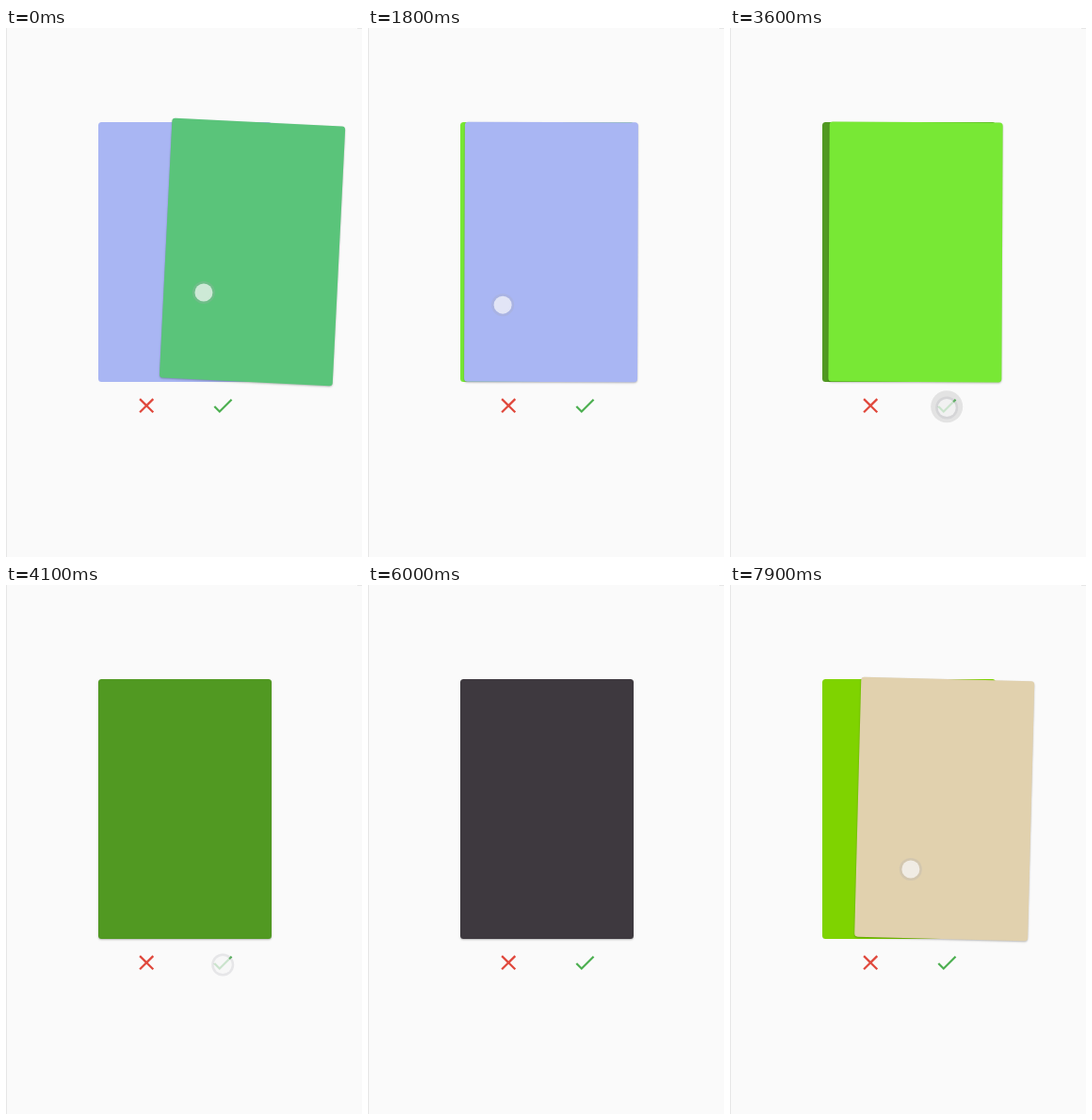
Recreate the animation shown at these times as an HTML page with a canvas. Size 378x562 px, loop 8 s.

```html
<!DOCTYPE html>
<html lang="en">
<head>
<meta charset="utf-8">
<title>Swipe cards</title>
<style>
  html, body { margin: 0; width: 100%; height: 100%; overflow: hidden; background: #fafafa; }
  canvas { display: block; }
</style>
</head>
<body>
<canvas id="stage" width="378" height="562"></canvas>
<script>
const ctx = document.getElementById('stage').getContext('2d');
const LOOP = 8000, STEP = 100;
const CARD = { x: 190, y: 238, w: 184, h: 276 };
const TILT = 15 / 378 * Math.PI / 180;   // rotation per pixel of offset
const GONE = 310;                        // offset at which a card has left the stage
const NO = { x: 149.2, y: 401.2 }, YES = { x: 230.2, y: 401.2 };
const CROSS = new Path2D('M19 6.41L17.59 5 12 10.59 6.41 5 5 6.41 10.59 12 5 17.59 6.41 19 12 13.41 17.59 19 19 17.59 13.41 12z');
const CHECK = new Path2D('M9 16.17L4.83 12l-1.42 1.41L9 19 21 7l-1.41-1.41z');

const clamp = v => Math.min(1, Math.max(0, v));
const smooth = v => v * v * (3 - 2 * v);
const fling = ms => 0.00346 * Math.max(0, ms) ** 2;

// The finger pulls the card smoothly to its reach, then lets it fly off
function drag(color, press, up, reach, x, y) {
  const offset = t => reach * smooth(clamp((t - press) / (up - press))) + fling(t - up);
  return {
    color, offset,
    dot: t => t >= press && t < up && { x: x + 1.05 * offset(t), y: y + 0.034 * offset(t) }
  };
}

// A button is pressed, and the card flies off to its side
function tap(color, button, press, go) {
  const dir = button === YES ? 1 : -1, end = go + 140;
  return {
    color,
    offset: t => dir * fling(t - go),
    dot: t => t >= press && t < go + 100 && { x: button.x, y: button.y + 2.3 },
    splash: t => t > press && t < end && {
      x: button.x, y: button.y + 1,
      r: Math.min(30, (t - press) * 0.085),
      alpha: 0.1 * clamp((end - t) / 100)
    }
  };
}

const cards = [
  drag('#5ac47a', -428, 700, 221.8, 134.8, 278.6),
  drag('#a9b6f3', 1750, 2400, 266, 138.4, 294),
  tap('#78e835', YES, 3400, 3555),
  tap('#519922', YES, 4100, 4434),
  tap('#d61b76', NO, 5400, 5455),
  tap('#3e393f', NO, 6400, 6431),
  drag('#e1d1ae', 7600, 8860, 263.5, 152.3, 300.7),
  { color: '#7fd300' }
];

function drawCard(color, dx, lifted) {
  ctx.save();
  ctx.translate(CARD.x + dx, CARD.y);
  ctx.rotate(dx * TILT);
  if (lifted) {
    ctx.shadowColor = 'rgba(0,0,0,.25)';
    ctx.shadowBlur = 2;
    ctx.shadowOffsetY = 1;
  }
  ctx.fillStyle = color;
  ctx.beginPath();
  ctx.roundRect(-CARD.w / 2, -CARD.h / 2, CARD.w, CARD.h, 3.5);
  ctx.fill();
  ctx.restore();
}

function drawIcon(path, color, { x, y }) {
  ctx.save();
  ctx.translate(x, y);
  ctx.scale(1.13, 1.13);
  ctx.translate(-12, -12);
  ctx.fillStyle = color;
  ctx.fill(path);
  ctx.restore();
}

function disc({ x, y }, r, color) {
  ctx.fillStyle = color;
  ctx.beginPath();
  ctx.arc(x, y, r, 0, Math.PI * 2);
  ctx.fill();
}

function draw(t) {
  ctx.fillStyle = '#fafafa';
  ctx.fillRect(0, 0, 378, 562);
  ctx.fillStyle = '#e6e6e6';
  ctx.fillRect(0, 0, 1, 562);
  ctx.fillRect(373, 0, 5, 1);

  const i = cards.findIndex(c => Math.abs(c.offset(t)) < GONE);
  const card = cards[i], dx = card.offset(t), dot = card.dot(t), splash = card.splash?.(t);

  if (splash) disc(splash, splash.r, `rgba(0,0,0,${splash.alpha})`);
  drawIcon(CROSS, '#e0483c', NO);
  drawIcon(CHECK, '#4caf50', YES);
  if (dx) drawCard(cards[i + 1].color, 0, false);
  drawCard(card.color, dx, true);
  if (dot) {
    disc(dot, 12, 'rgba(170,170,180,.25)');
    disc(dot, 9.5, 'rgba(255,255,255,.66)');
  }
}

function frame(now) {
  draw(Math.floor(now % LOOP / STEP) * STEP);
  requestAnimationFrame(frame);
}
draw(0);
requestAnimationFrame(frame);
</script>
</body>
</html>
```
